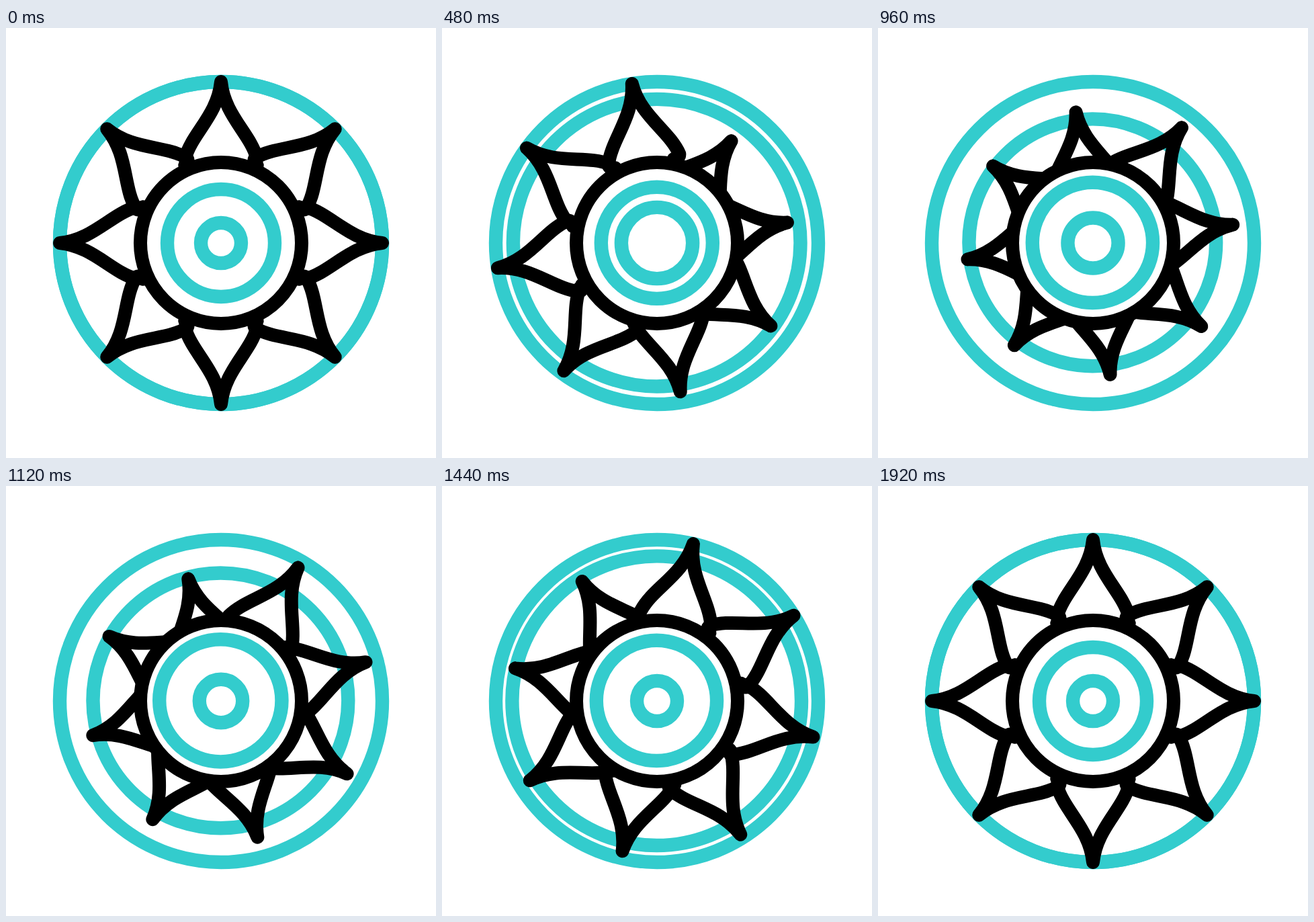
Recreate the animation shown at these times as an HTML page. Size 640x640 px, loop 2000 ms.

```html
<!DOCTYPE html>
<html lang="en">
<head>
<meta charset="utf-8">
<title>Sun mandala</title>
<style>
  html, body { margin: 0; width: 100%; height: 100%; overflow: hidden; background: #fff; }
  svg { display: block; width: 100vw; height: 100vh; }
</style>
</head>
<body>
<svg viewBox="-320 -320 640 640" fill="none" stroke-width="20" stroke-linecap="round" stroke-linejoin="round">
  <g stroke="#33cccd" stroke-width="20.4">
    <circle r="240"/>
    <circle id="halo" r="240"/>
  </g>
  <g id="petals" stroke="#000"></g>
  <circle r="120" fill="#fff" stroke="#000"/>
  <g stroke="#33cccd" stroke-width="20.4">
    <circle id="iris" r="80"/>
    <circle id="pupil" r="30"/>
  </g>
</svg>
<script>
const LOOP = 2000, STEP = 40, START = 80, END = 1880;
const PETALS = 8, STAGGER = 80;

const byId = id => document.getElementById(id);
const halo = byId('halo'), iris = byId('iris'), pupil = byId('pupil');

const clamp = u => Math.min(1, Math.max(0, u));
const smooth = u => u * u * (3 - 2 * u);
const soft = u => (u + smooth(u)) / 2;

// Rises from 0 to 1 between start and peak, then falls back to 0 at end.
function swell(t, start, peak, end, fall = smooth) {
  return t < peak
    ? smooth(clamp((t - start) / (peak - start)))
    : 1 - fall(clamp((t - peak) / (end - peak)));
}

function petalPath(curled) {
  const arm = side => {
    const curl = curled ? `Q${side * 53} -119 ${side * 44} -120` : '';
    return `M0 -240C${side * 5} -190 ${side * 43.5} -163 ${side * 53.5} -126${curl}`;
  };
  return arm(-1) + arm(1);
}

const petals = Array.from({ length: PETALS }, (_, i) => {
  const path = document.createElementNS('http://www.w3.org/2000/svg', 'path');
  path.setAttribute('d', petalPath(i % 2 === 1));
  return byId('petals').appendChild(path);
});

// The resizing rings drift slightly towards the upper left.
function setRing(ring, radius, drift = 0) {
  ring.setAttribute('r', radius);
  ring.setAttribute('cx', -drift);
  ring.setAttribute('cy', -drift);
}

function draw(t) {
  const inward = swell(t, START, 920, END);
  const outward = swell(t, START, 1280, END);
  setRing(halo, 240 - 56.4 * inward, 0.7 * inward);
  setRing(iris, 80 + 11.7 * outward, 0.7 * outward);
  setRing(pupil, 30 + 23.3 * swell(t, START, 440, 1280));

  const turn = 45 * swell(t, START, 640, END);
  petals.forEach((petal, i) => {
    const begin = START + i * STAGGER;
    const sink = 53.5 * swell(t, begin, begin + 440, begin + 1240, soft);
    petal.setAttribute('transform', `rotate(${turn + i * 45}) translate(0 ${sink})`);
  });
}

function tick() {
  const t = performance.now() % LOOP;
  draw(Math.floor(t / STEP) * STEP);
  requestAnimationFrame(tick);
}
tick();
</script>
</body>
</html>
```
